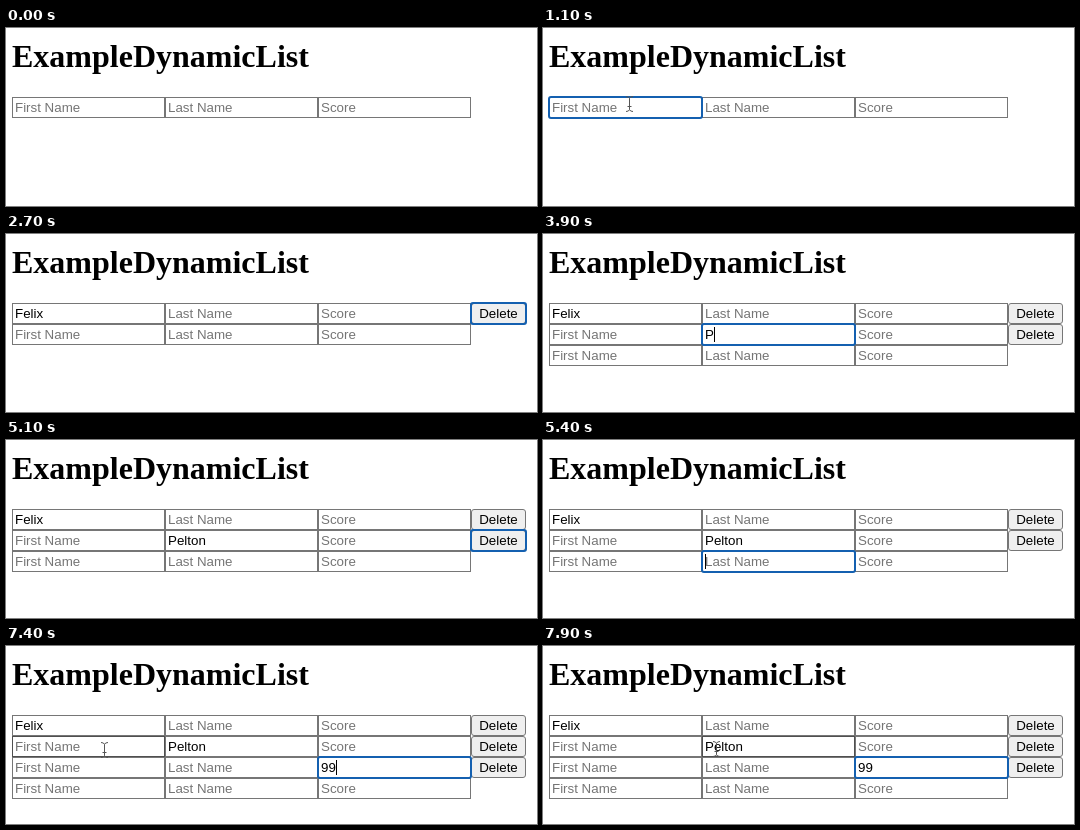
An HTML page that plays this animation: 531x178 px, repeating every 8 s.

```html
<!DOCTYPE html>
<html lang="en">
<head>
<meta charset="utf-8">
<title>ExampleDynamicList</title>
<style>
  html, body { margin: 0; width: 100%; height: 100%; overflow: hidden; background: #fff; }
  svg { display: block; width: 100%; height: 100%; }
  text { font: 13.333px "Liberation Sans", Arial, sans-serif; }
  .title { font: bold 32px "Liberation Serif", "Times New Roman", serif; }
  .box { fill: #fff; stroke: #767676; }
  .box.hover { stroke: #4f4f4f; }
  .button { fill: #efefef; stroke: #767676; }
  .hint { fill: #757575; }
  .ring { fill: none; stroke: #1460b0; stroke-width: 2; }
  .beam { fill: none; stroke: #555; }
  .arrow { fill: #000; stroke: #fff; stroke-linejoin: round; }
</style>
</head>
<body>
<svg id="stage" viewBox="0 0 531 178">
  <text class="title" x="6" y="39">ExampleDynamicList</text>
</svg>
<script>
const LOOP = 8000, BLINK = 500;
const LEFT = 6, TOP = 69, FIELD_W = 153, ROW_H = 21, BUTTON_W = 55, BUTTON_COL = 3;
const HINTS = ['First Name', 'Last Name', 'Score'];

// [time, row, column]
const focusSteps = [
  [600, 0, 0], [2300, 0, 1], [2500, 0, 2], [2700, 0, 3],
  [3000, 1, 0], [3300, 1, 1], [5100, 1, 3],
  [5300, 2, 0], [5400, 2, 1], [5700, 2, 2]
];

// One key time per letter
const entries = [
  { row: 0, col: 0, text: 'Felix', keys: [1300, 1400, 1600, 1700, 1900] },
  { row: 1, col: 1, text: 'Pelton', keys: [3900, 4100, 4300, 4400, 4500, 4560] },
  { row: 2, col: 2, text: '99', keys: [6100, 6300] }
];

// [time, x, y]; no position means hidden
const mouseSteps = [
  [0], [200, 161, 150], [300, 107, 96], [500, 90, 79], [600, 86, 76], [2300],
  [7300, 86, 80], [7400, 98, 104], [7500, 116, 124], [7600, 138, 129],
  [7700, 157, 119], [7800, 169, 108], [7900, 173, 103]
];

const stage = document.getElementById('stage');

function add(name, attrs, parent = stage) {
  const node = document.createElementNS('http://www.w3.org/2000/svg', name);
  for (const key in attrs) node.setAttribute(key, attrs[key]);
  parent.appendChild(node);
  return node;
}

const show = (node, on) => node.setAttribute('display', on ? 'inline' : 'none');
const place = (node, x, y) => node.setAttribute('transform', `translate(${x} ${y})`);
const latest = (steps, t) => steps.filter(step => step[0] <= t).pop();
const cellX = col => LEFT + col * FIELD_W;
const cellY = row => TOP + row * ROW_H;
const cellW = col => col === BUTTON_COL ? BUTTON_W : FIELD_W;

function makeField(row, col, parent) {
  const x = cellX(col), y = cellY(row);
  const box = add('rect', { x: x + .5, y: y + .5, width: FIELD_W - 1, height: ROW_H - 1 }, parent);
  const label = add('text', { x: x + 3, y: y + 15 }, parent);
  return { box, label };
}

function makeRow(row) {
  const group = add('g', {});
  const fields = HINTS.map((_, col) => makeField(row, col, group));
  const button = add('g', {}, group);
  const x = cellX(BUTTON_COL), y = cellY(row);
  add('rect', { class: 'button', x: x + .5, y: y + .5, width: BUTTON_W - 1, height: ROW_H - 1, rx: 2.5 }, button);
  add('text', { x: x + BUTTON_W / 2, y: y + 15, 'text-anchor': 'middle' }, button).textContent = 'Delete';
  return { group, fields, button };
}

const rows = [0, 1, 2, 3].map(makeRow);
const ring = add('rect', { class: 'ring', height: ROW_H, rx: 2 });
const caret = add('rect', { width: 1, height: 15 });
const beam = add('path', { class: 'beam', d: 'M-3-7.5Q0-7.5 .5-5.5Q1-7.5 4-7.5M.5-5.5V5.5M-3 7.5Q0 7.5 .5 5.5Q1 7.5 4 7.5M-1.5 2.5H2.5' });
const arrow = add('path', { class: 'arrow', d: 'M.5.5V14L3.7 11L6 16.3L8.3 15.3L6 10.2H10.4Z' });

const typed = (entry, t) => entry.text.slice(0, entry.keys.filter(key => key <= t).length);

function valueAt(row, col, t) {
  const entry = entries.find(e => e.row === row && e.col === col);
  return entry ? typed(entry, t) : '';
}

function fieldUnder(x, y, rowCount) {
  const row = Math.floor((y - TOP) / ROW_H), col = Math.floor((x - LEFT) / FIELD_W);
  const inside = row >= 0 && row < rowCount && col >= 0 && col < BUTTON_COL;
  return inside ? { row, col } : null;
}

function drawFocus(t) {
  const focus = latest(focusSteps, t);
  show(ring, focus);
  show(caret, false);
  if (!focus) return;
  const [start, row, col] = focus;
  const x = cellX(col), y = cellY(row);
  ring.setAttribute('x', x);
  ring.setAttribute('y', y);
  ring.setAttribute('width', cellW(col));
  if (col === BUTTON_COL) return;

  const keys = entries.flatMap(entry => entry.keys).filter(key => key <= t);
  const lastInput = Math.max(start, ...keys);
  const width = valueAt(row, col, t) ? rows[row].fields[col].label.getComputedTextLength() : 0;
  caret.setAttribute('x', Math.round(x + 3 + width));
  caret.setAttribute('y', y + 3);
  show(caret, Math.floor((t - lastInput) / BLINK) % 2 === 0);
}

function draw(t) {
  const filled = entries.filter(entry => typed(entry, t)).length;
  const [, mx, my] = latest(mouseSteps, t);
  const visible = mx !== undefined;
  const hover = visible ? fieldUnder(mx, my, filled + 1) : null;

  rows.forEach(({ group, fields, button }, row) => {
    show(group, row <= filled);
    show(button, row < filled);
    fields.forEach(({ box, label }, col) => {
      const value = valueAt(row, col, t);
      const over = hover && hover.row === row && hover.col === col;
      label.textContent = value || HINTS[col];
      label.setAttribute('class', value ? 'value' : 'hint');
      box.setAttribute('class', over ? 'box hover' : 'box');
    });
  });

  drawFocus(t);
  show(beam, visible && hover);
  show(arrow, visible && !hover);
  if (visible) place(hover ? beam : arrow, mx, my);
}

const begin = performance.now();
function tick() {
  draw((performance.now() - begin) % LOOP);
  requestAnimationFrame(tick);
}
tick();
</script>
</body>
</html>
```
